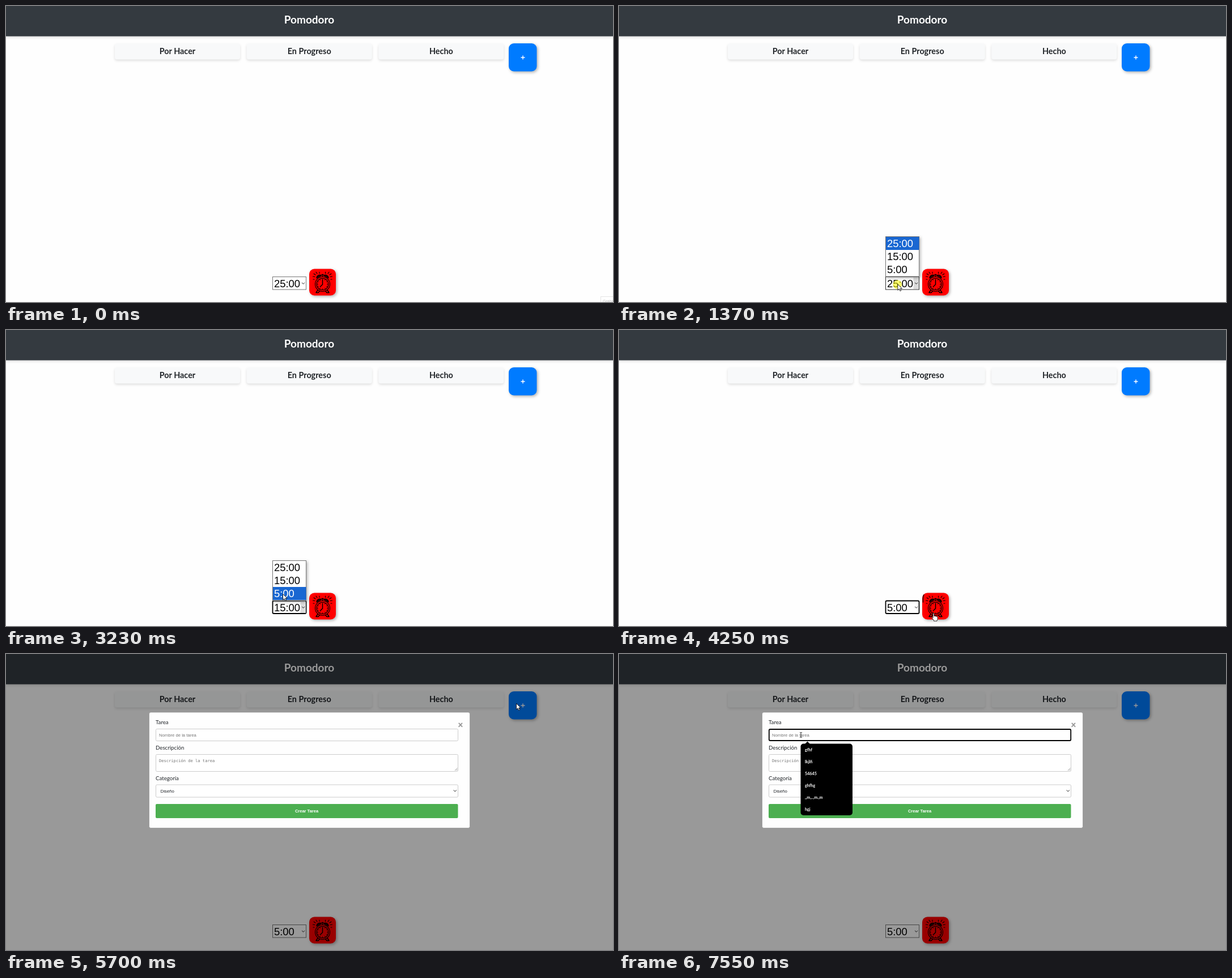
These frames come from a looping animation (1071x523 px, 8000 ms). An HTML page:

```html
<!DOCTYPE html>
<html lang="es">
<head>
<meta charset="utf-8">
<title>Pomodoro</title>
<style>
html, body { margin: 0; width: 100%; height: 100%; overflow: hidden; background: #fefefe; }
svg { display: block; }
text { font-family: Lato, sans-serif; fill: #212529; }
.arial { font-family: "Liberation Sans", Arial, sans-serif; }
.time { font-size: 18.4px; fill: #000; }
.mid { text-anchor: middle; }
.head { font-size: 14.4px; font-weight: 700; }
.label { font-size: 9.7px; }
.field { fill: #fff; stroke: #ccc; }
.hint { font-size: 7.7px; fill: #757575; }
.white { fill: #fff; }
.line { fill: none; stroke: #000; stroke-linecap: round; stroke-linejoin: round; }
.soft { filter: drop-shadow(0 2px 2px rgba(0,0,0,.13)); }
.raised { filter: drop-shadow(2px 2px 2.5px rgba(0,0,0,.3)); }
</style>
</head>
<body>
<svg width="1071" height="523" viewBox="0 0 1071 523">
  <rect width="1071" height="523" fill="#fefefe"/>
  <rect width="1071" height="53.5" fill="#343a40" class="soft"/>
  <text x="535" y="30.5" class="mid white" font-size="19" font-weight="700">Pomodoro</text>
  <g id="columns"></g>

  <rect id="add" x="887" y="66" width="49.5" height="49.5" rx="9" class="raised"/>
  <path d="M908.5 91h7M912 87.5v7" stroke="#fff" stroke-width="1.4"/>

  <!-- timer select -->
  <rect id="box" x="470.5" y="478.5" width="59" height="22.5" fill="#fff"/>
  <rect id="grip" x="519.5" y="479.5" width="9.5" height="20.5" fill="#dcdcdc"/>
  <path d="M522.3 489l2.2 2.2 2.2-2.2" class="line" stroke-width=".9"/>
  <text id="value" x="473" y="496.5" class="arial time"></text>

  <!-- alarm button -->
  <rect x="535" y="464.5" width="47" height="47" rx="9" fill="#f00" class="raised"/>
  <g class="line" stroke-width="1.1">
    <circle cx="558.5" cy="491.5" r="13"/>
    <circle cx="558.5" cy="491.5" r="10.3"/>
    <path d="M558.5 492V484M558.5 492l-4 4" stroke-width="1.5"/>
    <path d="M548 481a5.5 5.5 0 0 1 8.5-5zM569 481a5.5 5.5 0 0 0-8.5-5zM556.5 476q2-4 4 0M558.5 476v2.5" fill="#300"/>
    <path d="M550 502l-3 4.500h4l2-2.500M567 502l3 4.500h-4l-2-2.500" stroke-width="1.5"/>
    <path id="ticks" stroke-width=".8"/>
    <path d="M543 473l3 2M541.500 478l3.500.500M547 470l2 3M553 470v2.500M563.500 470v2.500M570 470l-2 3M574 473l-3 2M575.500 478l-3.500.500M542 483h2M575 483h-2"/>
  </g>
  <path id="edge" d="M538 468q-2 2-1.500 13" class="line" stroke-width="1.3"/>

  <g id="list">
    <rect x="470.500" y="407.500" width="59" height="70.500" fill="#fff" stroke="#777" class="raised"/>
    <rect id="pick" x="471" width="58.500" height="23" fill="#1967d2"/>
  </g>

  <g id="toast">
    <rect x="1049.500" y="513.500" width="30" height="20" fill="#fff" stroke="#e4e4e4"/>
    <text x="1053" y="523.500" class="arial" font-size="7" style="fill:#bbb">Graba</text>
  </g>

  <g id="modal">
    <rect width="1071" height="523" opacity=".4"/>
    <rect x="252.500" y="103" width="566" height="204.500" rx="3" fill="#fefefe" stroke="#888" stroke-width=".6"/>
    <text x="802" y="130.500" class="mid" font-size="16" font-weight="900" style="fill:#999">×</text>
    <text x="264" y="124.300" class="label">Tarea</text>
    <text x="264" y="169.300" class="label">Descripción</text>
    <text x="264" y="222.800" class="label">Categoría</text>
    <rect x="264.500" y="132.500" width="533" height="21" rx="2" class="field"/>
    <rect x="264.500" y="177.500" width="533" height="30" rx="2" class="field"/>
    <rect x="264.500" y="231" width="533" height="22" rx="2" class="field"/>
    <path d="M792 206l4.500-4.500M794.500 206l2-2" stroke="#777" stroke-width=".7"/>
    <path d="M790 240.700l2.300 2.300 2.300-2.300" class="line" stroke-width=".9"/>
    <text x="270" y="145.700" class="arial hint">Nombre de la tarea</text>
    <text x="270" y="190.500" class="hint" style="font:7.100px 'DejaVu Sans Mono',monospace">Descripción de la tarea</text>
    <text x="272.500" y="244.700" class="arial" font-size="7.800">Diseño</text>
    <rect x="264" y="265" width="533.500" height="25" rx="2" fill="#4caf50"/>
    <text x="530.500" y="280.200" class="arial mid white" font-size="7.500" font-weight="700">Crear Tarea</text>
    <rect id="focus" x="264.800" y="133" width="532.400" height="20" rx="2" class="line" stroke-width="1.800"/>
    <path id="caret" d="M270.500 138v10" stroke="#000" stroke-width=".8"/>
    <g id="hints">
      <path d="M327.500 159.500l5-5 5 5z"/>
      <rect x="320.500" y="158.500" width="91.500" height="126.500" rx="5"/>
    </g>
  </g>

  <circle id="click" fill="#ff0" opacity=".55"/>
  <g id="cursor" stroke="#000" stroke-width=".8" stroke-linejoin="round" fill="#fff">
    <path id="arrow" d="M.500.500v10.500l2.500-2.300 1.700 3.800 1.800-.8-1.700-3.700h3.400z"/>
    <path id="hand" d="M-1 1q1-2 2 0v4.500q1.300-1 2 .3 1.300-.8 2 .4 2-.5 2.200 1.300v3q-.2 1.500-1.200 2.500v1.200h-5.500v-1.200l-3.500-4.500q0-1.700 1.500-.8l.500.800z"/>
    <path id="beam" fill="none" d="M-2-4.500q2 0 2 1 0-1 2-1M0-3.500v7M-2 4.500q2 0 2-1 0 1 2 1"/>
  </g>
</svg>
<script>
const $ = id => document.getElementById(id);
const show = (id, on) => $(id).style.display = on ? '' : 'none';
const set = (id, attrs) => { for (const k in attrs) $(id).setAttribute(k, attrs[k]); };
const within = (t, a, b) => t >= a && t < b;
const add = (id, html) => $(id).insertAdjacentHTML('beforeend', html);

const times = ['25:00', '15:00', '5:00'];
const words = ['gfhf', 'lkjlñ', '54645', 'ghfhg', ',,m,..,m.,m', 'hgj'];

['Por Hacer', 'En Progreso', 'Hecho'].forEach((name, i) => {
  const x = 192 + 232.7 * i;
  add('columns', `<rect x="${x}" y="66.5" width="221" height="28" rx="4" fill="#f8f9fa" class="soft"/>
    <text x="${x + 110.5}" y="85" class="mid head">${name}</text>`);
});
times.forEach((s, i) => add('list', `<text x="473" y="${425.5 + 23 * i}" class="arial time">${s}</text>`));
const options = [...$('list').querySelectorAll('text')];
words.forEach((s, i) =>
  add('hints', `<text x="328" y="${172 + 21 * i}" class="white" font-size="7.2" font-weight="700">${s}</text>`));

let ticks = '';
for (let i = 0; i < 12; i++) {
  const c = Math.cos(i * Math.PI / 6), s = Math.sin(i * Math.PI / 6);
  ticks += `M${558.5 + 8 * c} ${491.5 + 8 * s}l${1.3 * c} ${1.3 * s}`;
}
set('ticks', { d: ticks });

// pointer stops: time, x, y
const path = [
  [70, 1062, 229], [450, 830, 370], [810, 607, 480], [1230, 491, 492], [1640, 492, 489],
  [1760, 490, 482], [2130, 488, 448], [2400, 488, 450], [2800, 488, 492], [2960, 488, 492],
  [3230, 488, 466], [3640, 488, 466], [4180, 541, 498], [4250, 555, 500], [5000, 555, 500],
  [5490, 900, 87], [5800, 900, 87], [6200, 600, 255], [6610, 325, 146], [6740, 321, 143]
];
const clicks = [1230, 2130, 2800, 3430, 4320, 5490, 6740];

function pointer(t) {
  const i = path.findIndex(p => p[0] > t);
  if (i < 0) return path[path.length - 1].slice(1);
  if (!i) return path[0].slice(1);
  const [a, x, y] = path[i - 1], [b, u, v] = path[i];
  let k = (t - a) / (b - a);
  k = k * k * (3 - 2 * k);
  return [x + (u - x) * k, y + (v - y) * k];
}

function draw(t) {
  const [x, y] = pointer(t);
  const over = (l, top, r, b) => within(x, l, r) && within(y, top, b);
  const modal = t >= 5700;
  const open = within(t, 1300, 2340) || within(t, 2870, 3640);
  const chosen = t < 2200 ? 0 : t < 3570 ? 1 : 2;
  const overAdd = !modal && over(887, 66, 937, 116);
  const hand = modal
    ? over(264, 265, 798, 290) || over(797, 120, 807, 131)
    : overAdd || over(542, 465, 582, 512);
  const beam = modal && (over(264, 132, 798, 154) || over(264, 177, 798, 208));

  set('add', { fill: overAdd ? '#0056b3' : '#007bff' });
  show('toast', t < 70);
  show('edge', within(t, 4180, 5700));
  show('modal', modal);

  const focused = within(t, 2200, 5490);
  set('box', {
    stroke: focused ? '#000' : open ? '#333' : '#767676',
    'stroke-width': focused ? 1.8 : 1, rx: focused ? 2 : 0
  });
  show('grip', open || (!modal && over(470, 478, 530, 501)));
  $('value').textContent = times[chosen];

  show('list', open);
  const row = over(470, 408, 530, 477) ? Math.floor((y - 408) / 23) : chosen;
  set('pick', { y: 408 + 23 * row });
  options.forEach((o, i) => o.style.fill = i === row ? '#fff' : '#000');

  show('focus', t >= 6810);
  show('caret', within(t, 6920, 7420));
  show('hints', t >= 6950);

  const start = clicks.find(c => within(t, c, c + 210));
  show('click', start !== undefined);
  if (start !== undefined) set('click', { cx: x, cy: y + 1, r: 8 + 5 * Math.max(0, 1 - (t - start) / 120) });

  show('cursor', t >= 70);
  set('cursor', { transform: `translate(${x} ${y})` });
  show('hand', hand);
  show('beam', beam);
  show('arrow', !hand && !beam);
}

const begin = performance.now();
function frame() {
  draw((performance.now() - begin) % 8000);
  requestAnimationFrame(frame);
}
frame();
</script>
</body>
</html>
```
